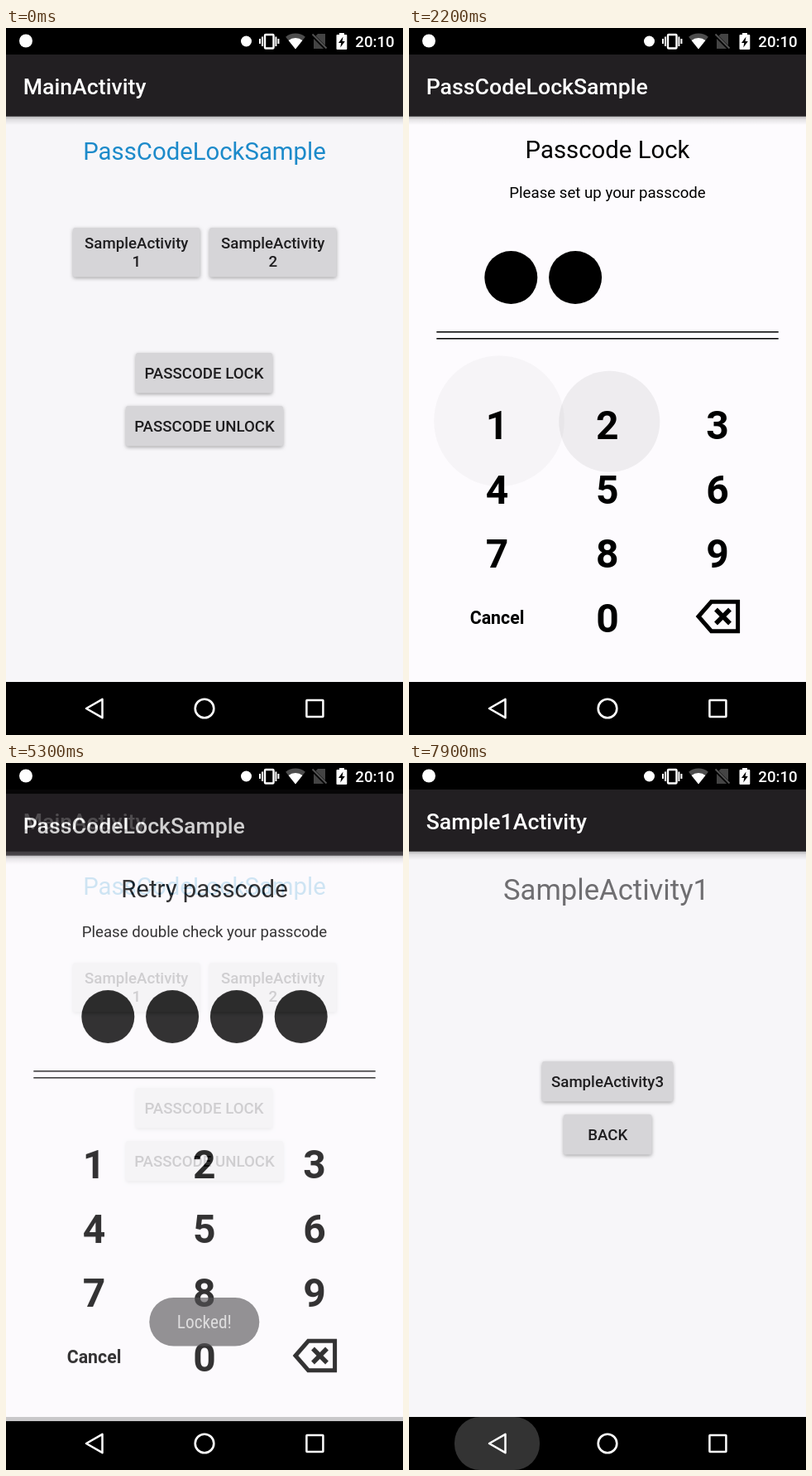
Animation, 480 px wide and 853 px high, one loop 8000 ms. Source, as an HTML page with a canvas:

```html
<!DOCTYPE html>
<html lang="en">
<head>
<meta charset="utf-8">
<title>Passcode lock demo</title>
<style>
html, body { margin: 0; width: 100%; height: 100%; overflow: hidden; background: #000; }
canvas { display: block; width: 480px; height: 853px; }
</style>
</head>
<body>
<canvas id="stage" width="480" height="853"></canvas>
<script>
const W = 480, H = 853, NAV = 789, LOOP = 8000, SLIDE = 68.24;
const screen = document.getElementById('stage').getContext('2d');
const layer = document.createElement('canvas');
layer.width = W;
layer.height = H;
const layerCtx = layer.getContext('2d');
let g = screen;

const LOCK_OPEN = 963, LOCK_CLOSE = 5141, SAMPLE_OPEN = 6930, RETRY = 3100;
// key, touch start, time its dot fills
const taps = [
  [1, 1840, 1900], [2, 2050, 2200], [3, 2340, 2400], [4, 2840, 2900],
  [1, 3678, 3700], [2, 3940, 4000], [3, 4240, 4300], [4, 4640, 4700]
];

const clamp = (v, a = 0, b = 1) => Math.min(b, Math.max(a, v));
const part = (t, start, length) => clamp((t - start) / length);
const decel = (p, n) => 1 - Math.pow(1 - p, n);

function text(str, x, y, size, color, weight = 400, align = 'center') {
  g.font = `${weight} ${size}px Roboto, sans-serif`;
  g.textAlign = align;
  g.fillStyle = color;
  g.fillText(str, x, y);
}

function rect(x, y, w, h, color) {
  g.fillStyle = color;
  g.fillRect(x, y, w, h);
}

function disc(x, y, r, color) {
  g.fillStyle = color;
  g.beginPath();
  g.arc(x, y, r, 0, Math.PI * 2);
  g.fill();
}

function poly(points, closed = true) {
  g.beginPath();
  points.forEach(([x, y]) => g.lineTo(x, y));
  if (closed) g.closePath();
}

function stroke(color, width, join = 'miter') {
  g.strokeStyle = color;
  g.lineWidth = width;
  g.lineJoin = join;
  g.stroke();
}

function pill(x, y, w, h, r, color) {
  g.fillStyle = color;
  g.beginPath();
  g.roundRect(x, y, w, h, r);
  g.fill();
}

// Window background with its bar
function page(title, color) {
  rect(0, 0, W, NAV, color);
  const shade = g.createLinearGradient(0, 106, 0, 117);
  shade.addColorStop(0, 'rgba(0,0,0,.3)');
  shade.addColorStop(0.4, 'rgba(0,0,0,.1)');
  shade.addColorStop(1, 'rgba(0,0,0,0)');
  rect(0, 106, W, 11, shade);
  rect(0, 0, W, 32, '#000');
  rect(0, 32, W, 74.7, '#221f22');
  text(title, 20.7, 79.5, 26.67, '#fff', 500, 'left');
}

function button(x, y, w, h, lines, press = 0) {
  g.save();
  g.shadowColor = 'rgba(0,0,0,.32)';
  g.shadowBlur = 4;
  g.shadowOffsetY = 1.5;
  pill(x, y, w, h, 2.7, '#d6d5d8');
  g.restore();
  if (press > 0) {
    g.save();
    g.beginPath();
    g.roundRect(x, y, w, h, 2.7);
    g.clip();
    disc(x + w / 2, y + h / 2, w * 0.6 * press, 'rgba(0,0,0,.06)');
    g.restore();
  }
  const base = y + h / 2 + 6.6 - (lines.length - 1) * 11;
  lines.forEach((s, i) => text(s, x + w / 2, base + i * 22, 18.67, '#1e1d1f', 500));
}

function mainPage(t) {
  page('MainActivity', '#f7f6f9');
  text('PassCodeLockSample', 240, 159, 29.33, '#1c8aca');
  button(81, 241, 153.5, 59.5, ['SampleActivity', '1'], t < 7300 ? decel(part(t, 6760, 350), 2) : 0);
  button(246, 241, 153.5, 59.5, ['SampleActivity', '2']);
  button(157, 392, 165, 48.5, ['PASSCODE LOCK'], t < 1400 ? decel(part(t, 760, 350), 2) : 0);
  button(145, 456, 190, 48.5, ['PASSCODE UNLOCK']);
}

function samplePage() {
  page('Sample1Activity', '#f7f6f9');
  text('SampleActivity1', 238.5, 165, 34.67, '#6f6e71');
  button(161, 360, 158, 48.5, ['SampleActivity3']);
  button(187, 424, 106.5, 48.5, ['BACK']);
}

const keyX = k => 106.5 + ((k - 1) % 3) * 133.3;
const keyY = k => 479 + Math.floor((k - 1) / 3) * 77.6;

function lockPage(t) {
  const retry = t >= RETRY;
  page('PassCodeLockSample', '#fdfbfe');
  text(retry ? 'Retry passcode' : 'Passcode Lock', 240, 157, 29.33, '#000');
  text(`Please ${retry ? 'double check' : 'set up'} your passcode`, 240, 204.5, 18.67, '#000');

  const filled = taps.filter(([, , at]) => t >= at && (at >= RETRY) === retry).length;
  for (let i = 0; i < 4; i++) {
    if (i < filled || retry) disc(123.3 + i * 77.8, 301, 32, i < filled ? '#000' : '#f3f2f5');
  }
  rect(33.3, 366, 413.4, 1.5, '#000');
  rect(33.3, 374, 413.4, 1.5, '#000');

  for (const [key, start] of taps) {
    const age = t - start;
    if (age < 0 || age > 500) continue;
    const grow = 1 - Math.exp(-age / 110);
    const fade = 1 - part(age, 200, 300);
    disc(keyX(key) + 2.5, keyY(key) - 5 + 24 * Math.pow(1 - grow, 2) * (grow < 0.7 ? 1 : 0.5),
      82 * grow, `rgba(0,0,0,${0.06 * fade})`);
  }

  for (let k = 1; k <= 9; k++) text(k, keyX(k), keyY(k) + 17, 48, '#000', 700);
  text('0', 240, 729, 48, '#000', 700);
  text('Cancel', 106.5, 718.7, 21.33, '#000', 700);

  poly([[350, 710], [365.5, 692.3], [397.6, 692.3], [397.6, 727.7], [365.5, 727.7]]);
  stroke('#000', 5);
  for (const d of [-1, 1]) {
    poly([[371, 710 - 8.5 * d], [388, 710 + 8.5 * d]], false);
    stroke('#000', 5.5);
  }
}

function show(draw, t, dy, alpha) {
  g = layerCtx;
  g.clearRect(0, 0, W, H);
  draw(t);
  g = screen;
  g.globalAlpha = alpha;
  g.drawImage(layer, 0, dy);
  g.globalAlpha = 1;
}

function enter(draw, t, start) {
  show(draw, t, SLIDE * Math.pow(1 - part(t, start, 350), 5), decel(part(t, start, 200), 4));
}

function leave(draw, t, start) {
  const age = (t - start) * 0.82;
  show(draw, t, SLIDE * Math.pow(part(age, 0, 250), 4), 1 - part(age, 100, 150));
}

function toast(t) {
  const alpha = decel(part(t, 5170, 400), 3) * (1 - part(t, 7420, 400));
  if (alpha <= 0) return;
  g.globalAlpha = alpha;
  pill(173.3, 645, 133, 58.5, 29.2, 'rgba(84,82,85,.9)');
  const face = size => `condensed ${size}px "Roboto Condensed", Roboto, sans-serif`;
  g.font = face(21.33);
  if (g.measureText('Locked!').width > 69) g.font = face(19);
  g.textAlign = 'center';
  g.fillStyle = '#fff';
  g.fillText('Locked!', 239.8, 682);
  g.globalAlpha = 1;
}

function statusBar() {
  rect(0, 0, W, 32, '#000');
  disc(24, 15.5, 8, '#fff');
  disc(290.5, 16, 6.5, '#fff');

  g.beginPath();
  g.roundRect(313, 8, 10.5, 16.5, 1);
  stroke('#fff', 2.4);
  for (const s of [-1, 1]) {
    rect(318.2 + s * 8.2 - 1, 10.5, 2, 11.5, '#fff');
    rect(318.2 + s * 11.2 - 1, 13, 2, 6, '#fff');
  }

  const fan = (r, color) => {
    g.fillStyle = color;
    g.beginPath();
    g.moveTo(350, 25.5);
    g.arc(350, 25.5, r, -Math.PI * 0.715, -Math.PI * 0.285);
    g.fill();
  };
  fan(19, '#4d4d4d');
  fan(13.5, '#fff');

  poly([[377, 7], [386, 7], [386, 25], [372, 25], [372, 12]]);
  g.fillStyle = '#444';
  g.fill();
  poly([[370, 8], [388, 26]], false);
  stroke('#000', 4);
  poly([[370.5, 7.5], [387.5, 24.5]], false);
  stroke('#555', 1.8);

  rect(403, 6, 6, 4, '#fff');
  pill(399.5, 8, 12.8, 18, 1, '#fff');
  poly([[407.5, 10.5], [402, 18], [405.2, 18], [404.3, 23.5], [409.8, 16], [406.6, 16]]);
  g.fillStyle = '#000';
  g.fill();
  text('20:10', 469.7, 23.3, 18.67, '#fff', 500, 'right');
}

function navBar(t) {
  const press = decel(part(t, 7740, 160), 2);
  if (press > 0) {
    const w = 103 * (0.8 + 0.2 * press);
    pill(106.5 - w / 2, NAV, w, 64, 31, `rgba(255,255,255,${0.2 * press})`);
  }
  poly([[97, 821], [116.5, 809.8], [116.5, 832.2]]);
  stroke('#fff', 2.5, 'round');
  g.beginPath();
  g.arc(240, 821, 11.3, 0, Math.PI * 2);
  stroke('#fff', 2.6);
  g.beginPath();
  g.roundRect(363.4, 811, 20, 20, 0.5);
  stroke('#fff', 2.5, 'round');
}

function render(t) {
  g = screen;
  rect(0, 0, W, H, '#000');
  if (t < LOCK_OPEN + 350) {
    mainPage(t);
    if (t > LOCK_OPEN) enter(lockPage, t, LOCK_OPEN);
  } else if (t < LOCK_CLOSE) {
    lockPage(t);
  } else if (t < SAMPLE_OPEN + 350) {
    mainPage(t);
    if (t < LOCK_CLOSE + 305) leave(lockPage, t, LOCK_CLOSE);
    if (t > SAMPLE_OPEN) enter(samplePage, t, SAMPLE_OPEN);
  } else {
    samplePage();
  }
  toast(t);
  statusBar();
  navBar(t);
}

let begin;
function tick(now) {
  begin ??= now;
  render((now - begin) % LOOP);
  requestAnimationFrame(tick);
}
render(0);
requestAnimationFrame(tick);
</script>
</body>
</html>
```
